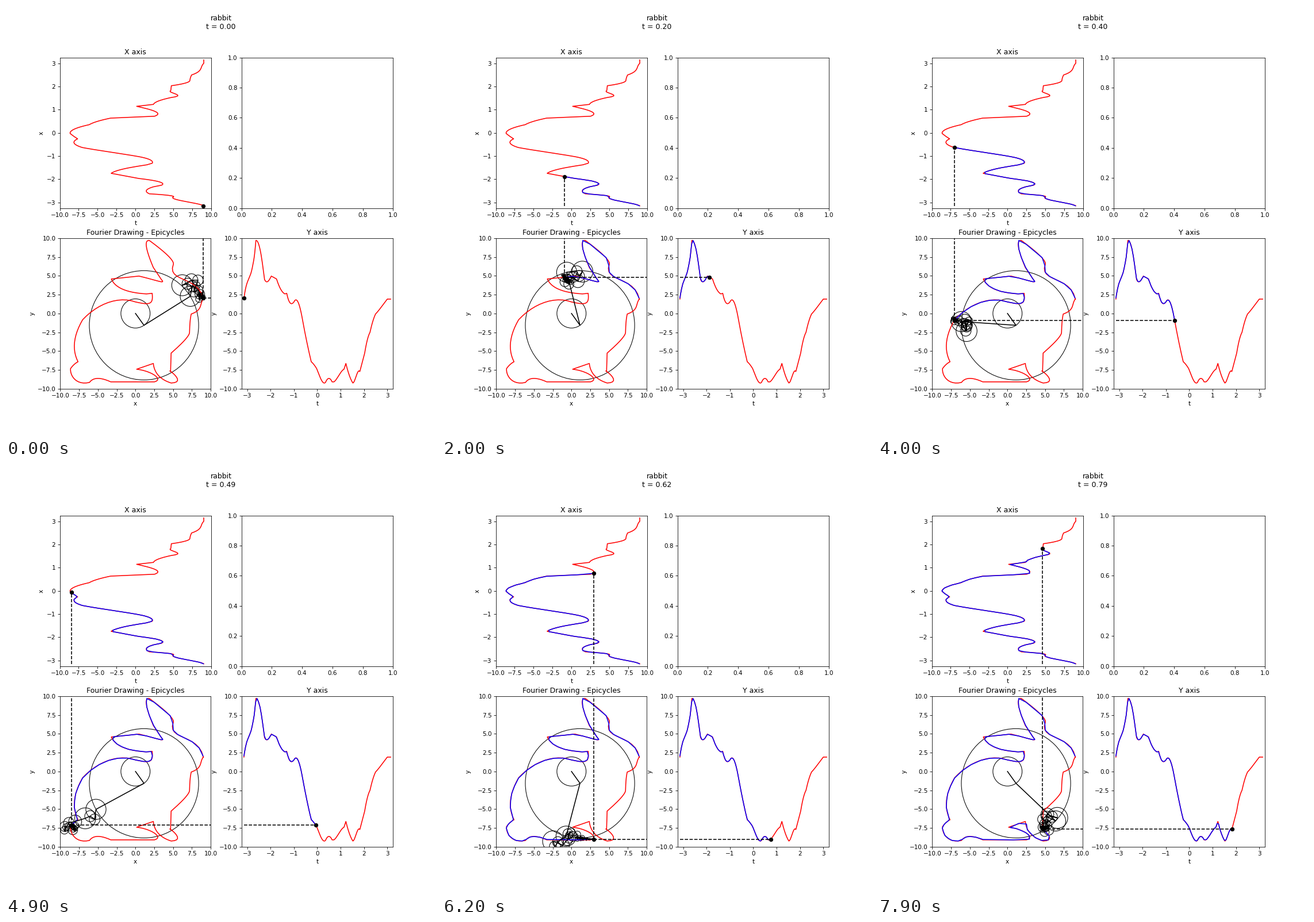
A matplotlib script for the animation above (8 s loop, 748x748 px).

```python
import numpy as np
import matplotlib.pyplot as plt
from matplotlib.animation import FuncAnimation
from matplotlib.collections import EllipseCollection

FRAMES, STEPS, ORDER = 80, 100, 50
PI = np.pi
SCALE = 13.09  # sketch units per axis unit

# Strokes of the rabbit: share of the lap at the end, then key points.
NOSE = 118 + 25j
STROKES = [
    (.062, 98 + 52j, 72 + 65j, 66 + 86j),           # face
    (.082, 56 + 101j, 24 + 127j),                   # front ear
    (.130, 19 + 116j, 31 + 80j),
    (.141, 45 + 59j),
    (.187, 46 + 55j, 33 + 58j, 6 + 65j),            # back ear
    (.2225, -42 + 60j),
    (.280, -22 + 42j, 19 + 34j),
    (.292, 29 + 35j),
    (.341, 28 + 21j, 19 + 17j, 20j),                # neck
    (.3995, -31 + 23j, -63 + 12j, -92 - 11j),       # back
    (.459, -106 - 50j, -100 - 84j),
    (.496, -107 - 89j, -113 - 96j),                 # tail
    (.556, -110 - 109j, -99 - 119j, -80 - 120j),
    (.601, -66 - 113j, -43 - 119j),
    (.614, 33 - 119j),                              # feet
    (.682, 38 - 112j, 25 - 103j, 2 - 97j),
    (.695, 31 - 87j),
    (.7425, 40 - 108j, 62 - 121j),
    (.790, 73 - 114j, 64 - 103j, 61 - 101j),
    (.823, 62 - 69j),                               # chest
    (.859, 86 - 46j, 94 - 33j),
    (.897, 95 - 14j, 97 - 1j),
    (.977, 110 + 7j, 114 + 16j, 118 + 25j),         # chin
    (1, NOSE),
]


def trace(strokes, samples=12):
    """Join polynomials, each through its evenly timed key points."""
    laps, path = [0], [NOSE]
    for end, *keys in strokes:
        knots = np.linspace(0, 1, len(keys) + 1)
        poly = np.linalg.solve(np.vander(knots), np.array([path[-1], *keys]))
        k = np.linspace(0, 1, samples + 1)[1:]
        laps.extend(laps[-1] + (end - laps[-1]) * k)
        path.extend(np.polyval(poly, k))
    return np.array(laps), np.array(path) / SCALE


laps, outline = trace(STROKES)
xs, ys, ts = outline.real, outline.imag, 2 * PI * laps - PI

# Fourier coefficients in the order 0, 1, -1, 2, -2, ...
freqs = np.array([0] + [s * n for n in range(1, ORDER + 1) for s in (1, -1)])
u = (np.arange(8000) + 0.5) / 8000
path = np.interp(u, laps, xs) + 1j * np.interp(u, laps, ys)
coefs = np.array([np.mean(path * np.exp(-2j * PI * n * u)) for n in freqs])
radii = np.abs(coefs)


def joints(share):
    """Ends of the chained arms, starting at the origin."""
    arms = coefs * np.exp(2j * PI * freqs * share)
    return np.concatenate([[0], np.cumsum(arms)])


chains = [joints(i / STEPS) for i in range(FRAMES)]
tips = np.array([c[-1] for c in chains])
times = 2 * PI * np.arange(FRAMES) / STEPS - PI

fig, ((ax_x, _), (ax_d, ax_y)) = plt.subplots(2, 2, figsize=(10, 10), dpi=74.8)
heading = fig.suptitle("rabbit\nt = 0.00")


def setup(ax, title, xlabel, ylabel, xlim, ylim):
    ax.set(title=title, xlabel=xlabel, ylabel=ylabel,
           xlim=(-xlim, xlim), ylim=(-ylim, ylim))


setup(ax_x, "X axis", "t", "x", 10, PI + 0.1)
setup(ax_y, "Y axis", "t", "y", PI + 0.1, 10)
setup(ax_d, "Fourier Drawing - Epicycles", "x", "y", 10, 10)
ax_d.set_aspect("equal")

ax_x.plot(xs, ts, "r-")
ax_y.plot(ts, ys, "r-")
ax_d.plot(xs, ys, "r-")

circles = EllipseCollection(2 * radii, 2 * radii, np.zeros(len(radii)), units="xy",
                            offsets=np.zeros((len(radii), 2)),
                            offset_transform=ax_d.transData,
                            facecolors="none", edgecolors="k", linewidths=1)
ax_d.add_collection(circles, autolim=False)


def line(ax, style):
    return ax.plot([], [], style)[0]


trails = [line(ax, "b-") for ax in (ax_x, ax_y, ax_d)]
arm = line(ax_d, "k-")
guides = [line(ax, "k--") for ax in (ax_x, ax_y, ax_d, ax_d)]
dots = [line(ax, "ko") for ax in (ax_x, ax_y, ax_d)]


def update(i):
    chain, t = chains[i], times[i]
    x, y = tips[i].real, tips[i].imag
    past, seen = times[:i + 1], tips[:i + 1]

    heading.set_text(f"rabbit\nt = {i / STEPS:.2f}")
    circles.set_offsets(np.column_stack([chain.real[:-1], chain.imag[:-1]]))
    arm.set_data(chain.real, chain.imag)

    trails[0].set_data(seen.real, past)
    trails[1].set_data(past, seen.imag)
    trails[2].set_data(seen.real, seen.imag)

    guides[0].set_data([x, x], [-PI, t])
    guides[1].set_data([-PI, t], [y, y])
    guides[2].set_data([x, x], [y, 10])
    guides[3].set_data([x, 10], [y, y])

    for dot, (a, b) in zip(dots, [(x, t), (t, y), (x, y)]):
        dot.set_data([a], [b])
    return [heading, circles, arm, *trails, *guides, *dots]


anim = FuncAnimation(fig, update, frames=FRAMES, interval=100,
                     init_func=lambda: update(0), repeat=True,
                     repeat_delay=0, blit=False)
plt.show()
```
